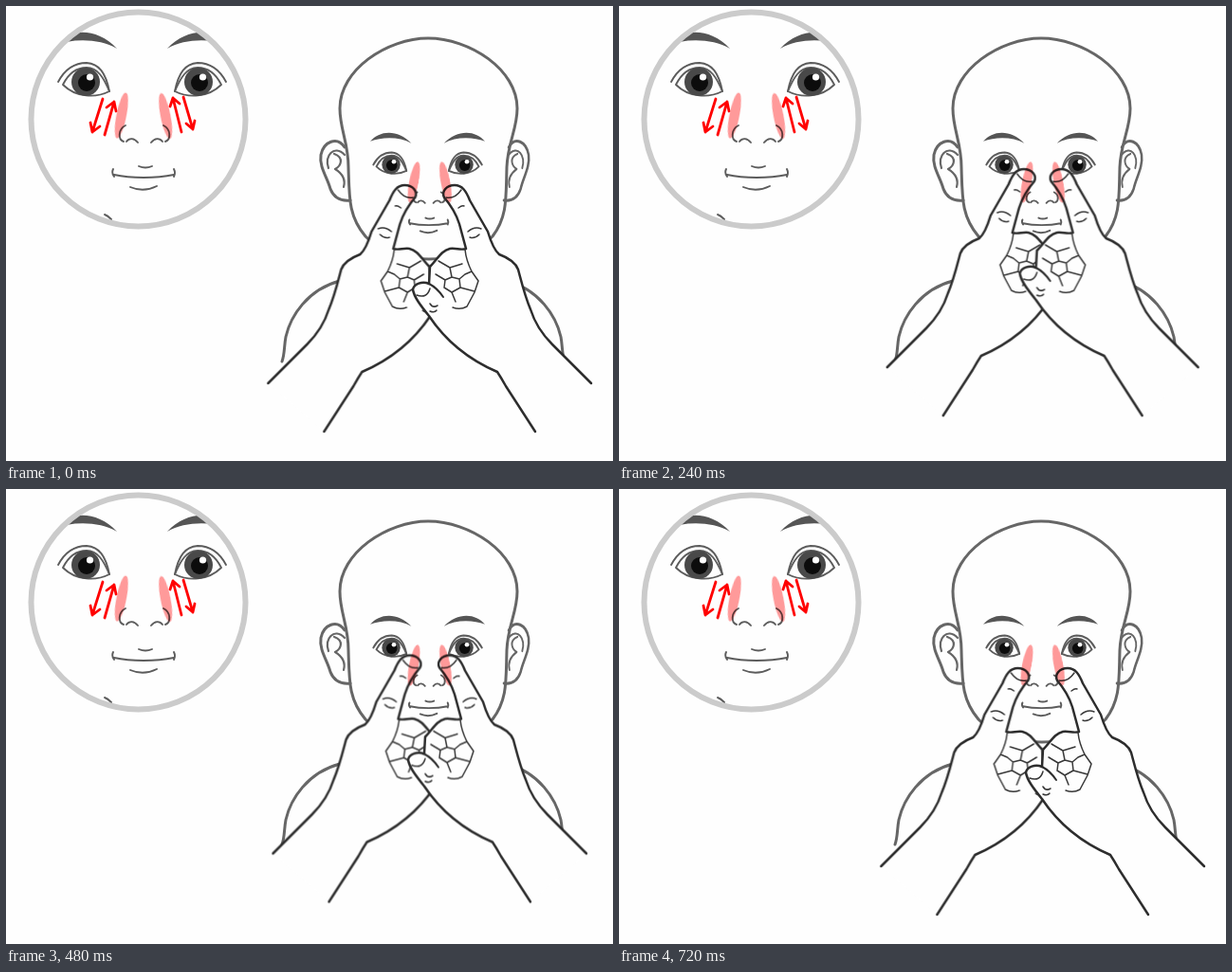
Recreate the animation shown at these times as an HTML page. Size 640 by 480 pixels, loop 0.8 s.

```html
<!DOCTYPE html>
<html lang="en">
<head>
<meta charset="utf-8">
<title>Nose massage</title>
<style>
  html, body { margin: 0; width: 100%; height: 100%; overflow: hidden; background: #fefefe; }
  svg { display: block; width: 640px; height: 480px; }
  path { fill: none; stroke-linecap: round; stroke-linejoin: round; }
  .head { stroke: #666; stroke-width: 3; }
  .fold { stroke: #666; stroke-width: 2.2; }
  .face { stroke: #5c5c5c; stroke-width: 1.9; vector-effect: non-scaling-stroke; }
  .brow { fill: #555; }
  .iris { fill: #494949; }
  .pupil { fill: #0c0c0c; }
  .shine { fill: #fff; }
  .zone { fill: #ff9a9a; mix-blend-mode: multiply; }
  .arrow { stroke: #f00; stroke-width: 2.8; }
  .skin { fill: #fefefe; stroke: #2d2d2d; stroke-width: 2.5; }
  .crease { stroke: #383838; stroke-width: 1.5; }
  .stroke { animation: rub 800ms infinite; }
  /* four steps up, five back down */
  @keyframes rub {
    0% { transform: translate(0, 0); animation-timing-function: steps(4, jump-end); }
    40% { transform: translate(-8.5px, -22.5px); animation-timing-function: steps(6, jump-none); }
    100% { transform: translate(0, 0); }
  }
</style>
</head>
<body>
<svg viewBox="0 0 640 480">
  <defs>
    <clipPath id="lens"><circle cx="139.5" cy="119.5" r="112"/></clipPath>

    <g id="lids">
      <path class="brow" d="M50 42C64 24 95 21 117 45C98 34 70 34 50 42Z"/>
      <path class="face" d="M60 83C66 71 75 65 85 65C97 65 103 76 109 90C95 97 74 97 60 83"/>
      <path class="face" d="M55 80C63 65 74 60 85 60C98 61 105 70 109 90"/>
    </g>
    <g id="ball">
      <circle class="iris" cx="84" cy="80" r="15"/>
      <circle class="pupil" cx="85" cy="81" r="9"/>
      <circle class="shine" cx="88.5" cy="75" r="3.6"/>
    </g>
    <g id="eyes">
      <use href="#lids"/>
      <use href="#lids" transform="translate(287) scale(-1 1)"/>
      <use href="#ball"/>
      <use href="#ball" x="119"/>
    </g>

    <g id="nostril">
      <path class="face" d="M126 126C118 130 118 141 124 143M127 143C130 139 135 139 139 144"/>
    </g>
    <g id="muzzle">
      <use href="#nostril"/>
      <use href="#nostril" transform="translate(292) scale(-1 1)"/>
      <path class="face" d="M140 169Q147 172 154 169M113 172Q111 176 114 180M114 178C132 182 158 182 177 178M177 180Q179 176 177 172M131 191Q145 197 159 190"/>
    </g>

    <g id="ear">
      <path class="head" d="M357 149C349 137 335 143 332 157C330 170 339 181 342 193C346 203 354 206 363 205"/>
      <path class="fold" d="M357 157C346 146 335 158 340 171M346 156C357 160 353 169 347 172C355 177 358 184 356 191"/>
    </g>
    <path id="shoulder" class="head" d="M352 290C318 299 300 327 295 349C293 360 294 367 291 375"/>

    <g id="hand">
      <path class="skin" d="M617 398L576 357C566 347 558 336 553 320C547 306 544 293 540 278C537 270 528 265 520 262C514 257 511 248 508 238L489 205C485 195 481 189 473 189C464 189 459 196 462 202C468 209 474 217 478 230L485 256C480 258 474 255 468 256C459 258 455 267 447 275L446 293C439 290 430 293 429 299C430 307 438 317 446 327C466 357 490 374 518 386Q522 392 527 401L558 449"/>
      <path class="skin" style="fill:none;stroke-width:2" d="M446 293C452 296 457 301 461 307"/>
      <path class="crease" d="M433 305Q444 309 447 298M447 314Q450 319 455 316M447 322Q452 324 454 321M464 202Q473 204 480 194M487 238Q494 232 501 235M489 244Q494 246 499 241M477 213Q481 210 483 211"/>
      <path class="crease" d="M484 257C485 267 488 274 491 280L498 290L494 302L486 317Q479 321 471 318M456 269L468 276L481 272M468 276L470 286M453 283L463 289L470 286L478 288L484 283L491 280M463 289L462 297L470 302L479 297L478 288M479 297L494 301M470 302L474 312"/>
    </g>
  </defs>

  <!-- close-up -->
  <g clip-path="url(#lens)">
    <use href="#eyes"/>
    <use href="#muzzle"/>
    <path class="face" d="M104 220Q107 221 111 225"/>
    <ellipse class="zone" rx="5.3" ry="24.5" transform="translate(121.7 115.5) rotate(11)"/>
    <ellipse class="zone" rx="5.3" ry="24.5" transform="translate(168.2 116) rotate(-11)"/>
  </g>
  <path class="arrow" d="M102 98L91 133M89 123L91 133L99 127M104 136L114 101M106 107L114 101L116 111"/>
  <path class="arrow" d="M185 133L176 97M173 106L176 97L183 103M187 96L197 130M190 124L197 130L199 121"/>
  <circle cx="139.5" cy="119.5" r="113" fill="none" stroke="#cbcbcb" stroke-width="6"/>

  <!-- child -->
  <use href="#shoulder"/>
  <use href="#shoulder" transform="translate(880) scale(-1 1)"/>
  <use href="#ear"/>
  <use href="#ear" transform="translate(829.9) scale(-.84 1)"/>
  <path class="head" fill="#fefefe" d="M445 34C402 34 352 67 352 108C352 130 361 144 361 170C362 202 361 222 379 243C395 260 420 267 446 267C471 267 497 260 513 243C529 222 527 202 528 170C529 144 539 130 539 108C539 67 489 34 445 34Z"/>
  <use href="#eyes" transform="translate(351.7 115.7) scale(.647)"/>
  <use href="#muzzle" transform="translate(354.2 117.1) scale(.63)"/>

  <!-- hands -->
  <g transform="translate(893.4) scale(-1 1)"><use class="stroke" href="#hand"/></g>
  <use class="stroke" href="#hand"/>

  <ellipse class="zone" rx="5" ry="22" transform="translate(430 186) rotate(11)"/>
  <ellipse class="zone" rx="5" ry="22" transform="translate(463.5 186) rotate(-11)"/>
</svg>
</body>
</html>
```
